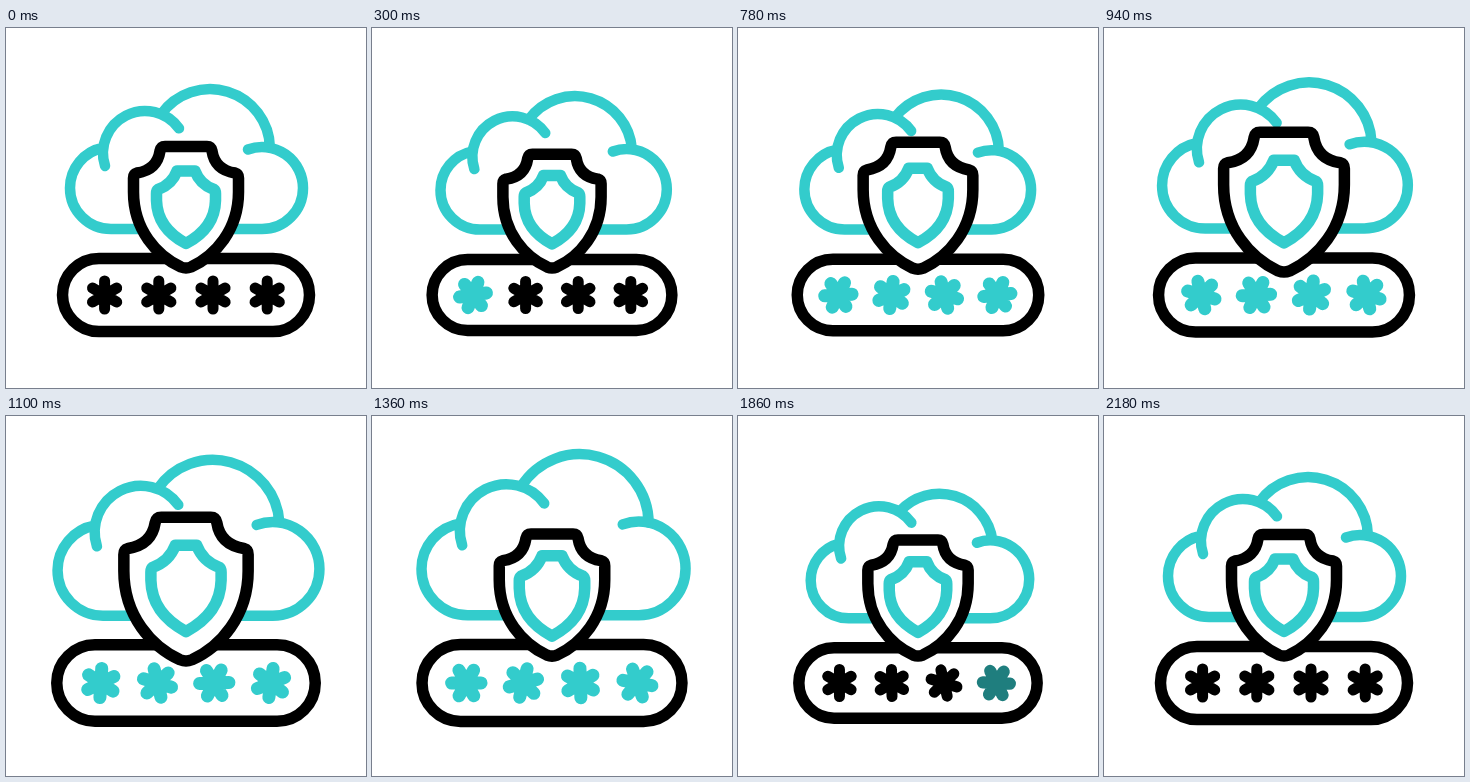
Recreate the animation shown at these times as an HTML page. Size 360 px wide and 360 px high, loop 2.36 s.

```html
<!DOCTYPE html>
<html lang="en">
<head>
<meta charset="utf-8">
<title>Cloud password shield</title>
<style>
  html, body { margin: 0; width: 100%; height: 100%; overflow: hidden; background: #fff; }
  svg { display: block; width: 100vw; height: 100vh; }
  path, rect { vector-effect: non-scaling-stroke; stroke-linecap: round; stroke-linejoin: round; }
  .cyan { fill: none; stroke: #33cccc; stroke-width: 10.5; }
  .black { fill: #fff; stroke: #000; stroke-width: 11.5; }
  #core path { stroke-width: 11.5; }
</style>
</head>
<body>
<svg viewBox="0 0 360 360">
  <path id="cloud" class="cyan"/>
  <g id="bar">
    <rect class="black" x="-123.5" y="-36.5" width="247" height="73" rx="36.5"/>
  </g>
  <g id="shield">
    <path class="black" d="M-21 -121.5H21Q25 -121.5 26 -117C28 -104 36 -97 49 -95Q52.5 -94 52.5 -90V-76C52.5 -38 29 -12 5 -1Q0 1 -5 -1C-29 -12 -52.5 -38 -52.5 -76V-90Q-52.5 -94 -49 -95C-36 -97 -28 -104 -26 -117Q-25 -121.5 -21 -121.5Z"/>
  </g>
  <g id="core">
    <path class="cyan" d="M-9 -73.5H9Q14 -60 28 -55Q29.5 -54 29.5 -51V-44C29 -22 15 -9 0 -1C-15 -9 -29 -22 -29.5 -44V-51Q-29.5 -54 -28 -55Q-14 -60 -9 -73.5Z"/>
  </g>
</svg>
<script>
const LOOP = 2360, START = 160, END = 2160;
const el = id => document.getElementById(id);
const clamp = v => Math.min(1, Math.max(0, v));
const ease = u => (1 - Math.cos(Math.PI * u)) / 2;

// Scale over time: shrink until dip, swell until rise, stay until hold, shrink again until sink, return.
const swing = (low, high, low2, dip, rise, hold, sink) => t =>
  [[START, dip, low - 1], [dip, rise, high - low], [hold, sink, low2 - high], [sink, END, 1 - low2]]
    .reduce((s, [from, to, change]) => s + change * ease(clamp((t - from) / (to - from))), 1);

const barScale = swing(0.935, 1.058, 0.964, 460, 1260, 1260, 1900);
const shieldScale = swing(0.872, 1.185, 0.908, 440, 1080, 1080, 1550);
const coreScale = swing(0.872, 1.19, 0.967, 460, 1110, 1110, 1720);

// Cloud lobes as circles around the middle of the cloud's bottom line.
const lobes = {
  left: { x: -75, y: 41, r: 41, scale: swing(0.905, 1.125, 0.925, 480, 1240, 1500, 1860) },
  small: { x: -41, y: 76, r: 42, scale: swing(0.9, 1.11, 0.95, 480, 1200, 1440, 1860) },
  big: { x: 24, y: 80, r: 60, scale: swing(0.885, 1.15, 0.89, 480, 1300, 1500, 1860) },
  right: { x: 76, y: 41, r: 41, scale: swing(0.92, 1.165, 0.95, 600, 1230, 1230, 1840) }
};
const floorY = t => 201 - 12 * (lobes.big.scale(t) - 1);

const circle = ({ x, y, r, scale }, t) => {
  const s = scale(t);
  return { x: 180 + x * s, y: floorY(t) - y * s, r: r * s };
};
const rim = (c, deg) => {
  const a = deg * Math.PI / 180;
  return [c.x + c.r * Math.cos(a), c.y + c.r * Math.sin(a)];
};
// Upper crossing of two circles, with a to the left of b.
function meet(a, b) {
  const dx = b.x - a.x, dy = b.y - a.y, d = Math.hypot(dx, dy);
  const k = (a.r * a.r - b.r * b.r + d * d) / (2 * d);
  const h = Math.sqrt(Math.max(0, a.r * a.r - k * k));
  return [a.x + (k * dx + h * dy) / d, a.y + (k * dy - h * dx) / d];
}
const arc = (c, p) => `A${c.r} ${c.r} 0 0 1 ${p}`;

function cloudPath(t) {
  const [l, s, b, r] = Object.values(lobes).map(c => circle(c, t));
  const y = floorY(t);
  return `M180 ${y}H${l.x}` + arc(l, [l.x - l.r, l.y]) + arc(l, meet(l, s))
    + `M${rim(s, 162)}` + arc(s, rim(s, -36))
    + `M${meet(s, b)}` + arc(b, meet(b, r))
    + `M${rim(r, -110)}` + arc(r, rim(r, 0)) + arc(r, [r.x, y]) + 'H180';
}

const stars = [0, 1, 2, 3].map(i => {
  const p = document.createElementNS('http://www.w3.org/2000/svg', 'path');
  p.setAttribute('d', 'M0 -14V14M-12.1 -7L12.1 7M-12.1 7L12.1 -7');
  el('bar').append(p);
  return p;
});

function drawStar(p, i, t) {
  const u = clamp((t - START - 155 * i) / 1560);
  const turn = 180 * u * (1.35 - 0.35 * u);
  const tint = clamp((t - 240 - 100 * i) / 60) - clamp((t - 1508 - 110 * i) / 60);
  const c = [51, 204, 204].map(v => Math.round(v * tint));
  p.setAttribute('transform', `translate(${54.2 * i - 81.4} 0) rotate(${turn})`);
  p.setAttribute('stroke', `rgb(${c})`);
  p.setAttribute('stroke-width', 11 + 2 * tint);
}

const place = (id, y, s) => el(id).setAttribute('transform', `translate(180 ${y}) scale(${s})`);

function draw() {
  const t = performance.now() % LOOP;
  const shield = shieldScale(t), core = coreScale(t);
  el('cloud').setAttribute('d', cloudPath(t));
  place('bar', 267, barScale(t));
  place('shield', 240 + 27 * Math.max(0, shield - 1), shield);
  place('core', 216.5 + 45 * (core - shield), core);
  stars.forEach((p, i) => drawStar(p, i, t));
  requestAnimationFrame(draw);
}
draw();
</script>
</body>
</html>
```
